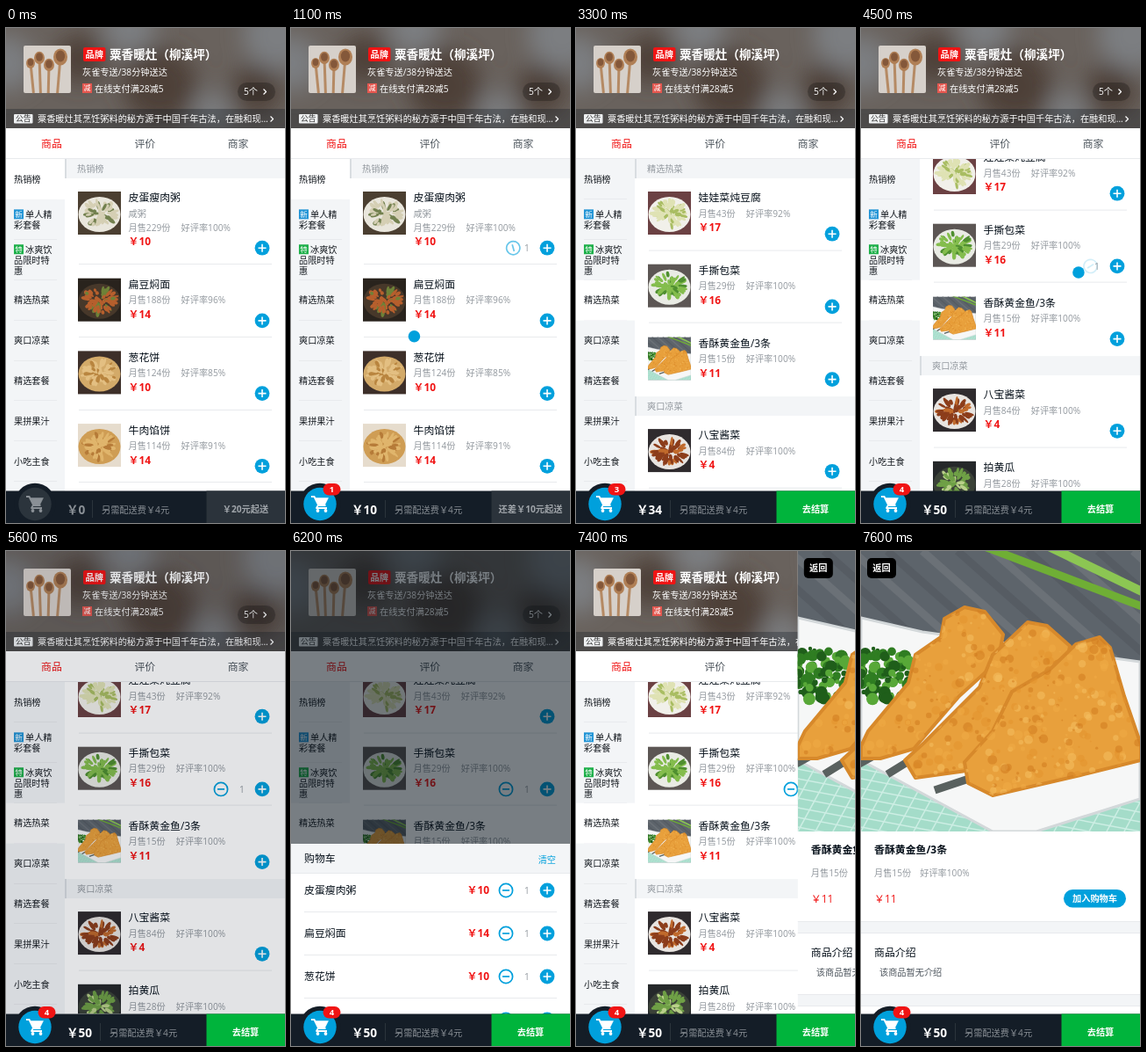
Write an HTML page that moves like this. It is 318 px wide and 563 px high and loops after 8000 ms.

```html
<!DOCTYPE html>
<html lang="zh-CN">
<head>
<meta charset="utf-8">
<style>
html, body { margin: 0; width: 100%; height: 100%; overflow: hidden; background: #fff; }
svg { display: block; font-family: "Open Sans", "Noto Sans CJK SC", "Noto Sans CJK", sans-serif; }
</style>
</head>
<body>
<svg id="stage" width="318" height="563" viewBox="0 0 318 563"></svg>
<script>
const LOOP = 8000, TOP = 149, FOOT = 526.5, ROW = 45.9, ADD_TIME = 240;
const BLUE = '#00a0dc', RED = '#f01414', INK = '#07111b', GREY = '#93999f', PALE = '#f3f5f7', LINE = '#e8eaed';
const SHOP = '粟香暖灶';

// name, sold, rating, price, description, [table, plate, food, garnish]
const sections = [
  ['热销榜', [
    ['皮蛋瘦肉粥', 229, 100, 10, '咸粥', ['#4b3f31', '#e9e6dc', '#d5cfb4', '#72804e']],
    ['扁豆焖面', 188, 96, 14, '', ['#29231d', '#47382a', '#b65f2d', '#6e8238']],
    ['葱花饼', 124, 85, 10, '', ['#3d2f29', '#d3aa69', '#e3bf82', '#b9853f']],
    ['牛肉馅饼', 114, 91, 14, '', ['#e6dccd', '#cf9d54', '#e0b56c', '#b67b38']],
    ['招牌猪肉白菜锅贴/10个', 101, 78, 17, '', ['#5a4b3c', '#eeeae0', '#dfb873', '#b9823c']],
    ['南瓜粥', 91, 100, 9, '甜粥', ['#4d4136', '#f0eee6', '#e8a92f', '#d98e1f']],
    ['红豆薏米美肤粥', 86, 100, 12, '甜粥', ['#66574a', '#eeeae6', '#8d4038', '#c59d86']],
    ['八宝酱菜', 84, 100, 4, '', ['#2f2b2e', '#e8e4e0', '#8c3d1b', '#c06a2c']],
    ['红枣山药糙米粥', 81, 91, 10, '', ['#59483a', '#eee9df', '#d9c6a2', '#9d3b29']],
    ['糊塌子', 80, 93, 10, '', ['#7b6b58', '#eee8dc', '#d9b54f', '#8da04a']]]],
  ['单人精彩套餐', [['红枣山药粥套餐', 17, 100, 29, '', ['#6b5947', '#eee9df', '#d7bd91', '#8c3b2a']]]],
  ['冰爽饮品限时特惠', [['VC无限橙果汁', 15, 100, 8, '', ['#cfd8d2', '#f4e5bd', '#f0a021', '#e87d16']]]],
  ['精选热菜', [
    ['娃娃菜炖豆腐', 43, 92, 17, '', ['#6b4143', '#f1f0ea', '#dfe2b4', '#a9bd62']],
    ['手撕包菜', 29, 100, 16, '', ['#5c5654', '#e9ebe4', '#84bd4d', '#4f8f30']],
    ['香酥黄金鱼/3条', 15, 100, 11, '', null]]],
  ['爽口凉菜', [
    ['八宝酱菜', 84, 100, 4, '', ['#2f2b2e', '#e8e4e0', '#8c3d1b', '#c06a2c']],
    ['拍黄瓜', 28, 100, 2, '', ['#25282a', '#3b4238', '#6fa046', '#b9d08a']]]]
];
const orders = [
  { name: '皮蛋瘦肉粥', price: 10, at: 960, y: 250 },
  { name: '扁豆焖面', price: 14, at: 1260, y: 332 },
  { name: '葱花饼', price: 10, at: 1760, y: 415 },
  { name: '手撕包菜', price: 16, at: 4460, y: 270 }
];

let seed = 7;
const random = () => (seed = seed * 16807 % 2147483647) / 2147483647;
const $ = id => document.getElementById(id);
const clamp = v => Math.max(0, Math.min(1, v));
const span = (t, start, length) => clamp((t - start) / length);
const easeOut = p => 1 - (1 - p) ** 4;

// CSS "ease": cubic-bezier(.25, .1, .25, 1)
function ease(p) {
  const curve = (u, a, b) => 3 * u * (1 - u) ** 2 * a + 3 * u * u * (1 - u) * b + u ** 3;
  let low = 0, high = 1;
  for (let i = 0; i < 20; i++) {
    const mid = (low + high) / 2;
    curve(mid, .25, .25) < p ? low = mid : high = mid;
  }
  return curve(low, .1, 1);
}

const text = (x, y, s, size = 10.2, fill = GREY, more = '') =>
  `<text x="${x}" y="${y + size * .37}" font-size="${size}" fill="${fill}" ${more}>${s}</text>`;
const rect = (x, y, w, h, fill, more = '') =>
  `<rect x="${x}" y="${y}" width="${w}" height="${h}" fill="${fill}" ${more}/>`;
const rule = (x, y, w) => rect(x, Math.round(y), w, 1, LINE);
const circle = (x, y, r, fill, more = '') => `<circle cx="${x}" cy="${y}" r="${r}" fill="${fill}" ${more}/>`;
const ellipse = (x, y, rx, ry, fill, more = '') =>
  `<ellipse cx="${x}" cy="${y}" rx="${rx}" ry="${ry}" fill="${fill}" ${more}/>`;
const path = (d, stroke, width, fill = 'none') =>
  `<path d="${d}" stroke="${stroke}" stroke-width="${width}" fill="${fill}" stroke-linejoin="round"/>`;
const BOLD = 'font-weight="700" ', MEDIUM = 'font-weight="500" ', MID = 'text-anchor="middle" ', END = 'text-anchor="end" ';

const plus = y => circle(292, y, 8.4, BLUE) + path(`M287.5 ${y}h9M292 ${y - 4.5}v9`, '#fff', 1.6);
const minus = y => circle(245, y, 7.6, '#fff', `stroke="${BLUE}" stroke-width="1.7"`) + path(`M241 ${y}h8`, BLUE, 1.7);
const amount = y => text(269, y, 1, 10.2, GREY, MID);

function fishPhoto() {
  const fish = [
    'M0 222L8 205 54 150 62 118 91 98 95 77 118 64 141 69 162 95 156 125 112 165 60 225 22 236 0 236Z',
    'M50 238L72 218 135 155 150 118 172 98 190 81 212 85 238 108 234 130 170 200 120 250 62 258Z',
    'M118 240L150 205 172 160 215 135 245 106 272 98 284 110 300 165 319 220V238L250 255 150 278 122 264Z'];
  let s = rect(0, 0, 318, 319, '#5d646b');
  for (let i = 0; i < 12; i++) s += path(`M${i * 40 - 130} 0l170 150`, i % 2 ? '#6b7177' : '#565c63', 9);
  s += path('M138 -6L320 63', '#6fae35', 9) + path('M212 -6L320 46', '#8cc653', 10);
  s += rect(0, 200, 318, 119, '#a4dcc9');
  for (let i = 0; i < 20; i++) s += path(`M${i * 20 - 60} 319l60 -110M0 ${215 + i * 11}l318 60`, '#cdeee4', 1.5);
  s += path('M0 76L70 92 318 126V282L200 319H150L0 238Z', '#d3d8da', 3, '#f6f7f7');
  for (let i = 0; i < 90; i++) {
    const a = random() * 6.3, r = Math.sqrt(random());
    s += circle(26 + 34 * r * Math.cos(a), 139 + 32 * r * Math.sin(a), 2 + random() * 5, ['#2f7d22', '#58a838', '#1f5e1a'][i % 3]);
  }
  s += path('M-2 242L16 232M30 254L56 238M84 272L132 256', '#59615f', 9);
  fish.forEach((d, i) => {
    s += `<clipPath id="fish${i}"><path d="${d}"/></clipPath>` + path(d, '#d7892b', 4, '#e8a03c') + `<g clip-path="url(#fish${i})">`;
    for (let k = 0; k < 420; k++)
      s += circle(i * 55 + random() * 210, 60 + random() * 220, 1 + random() * 4.5, ['#f6bf62', '#d27d1f', '#f0ab45', '#e4942f'][k % 4], 'opacity=".55"');
    s += '</g>';
  });
  return s;
}

function dishPhoto([table, plate, food, garnish]) {
  let s = rect(0, 0, 49, 49, table) + ellipse(24.5, 26, 24, 20, plate);
  for (let i = 0; i < 70; i++) {
    const a = random() * 6.3, r = Math.sqrt(random());
    const x = 24.5 + 18 * r * Math.cos(a), y = 25 + 14 * r * Math.sin(a);
    s += ellipse(x, y, 2 + random() * 3.5, 1.3 + random(), i % 4 ? food : garnish, `transform="rotate(${a * 57} ${x} ${y})"`);
  }
  return s;
}

const offsets = [];
function foodList() {
  let y = TOP, s = '';
  for (const [title, foods] of sections) {
    offsets.push(y - TOP);
    s += rect(67, y, 251, 22, PALE) + rect(67, y, 2, 22, '#d9dde1') + text(81, y + 11, title);
    y += 22;
    foods.forEach(([name, sold, rate, price, about, look], i) => {
      const extra = about ? 16 : 0, height = 82.2 + extra, control = y + height - 19;
      const photo = look ? dishPhoto(look) : '<use href="#fishPhoto" transform="scale(.154)"/>';
      s += `<g transform="translate(82 ${y + 15})">${photo}</g>`;
      s += text(139.5, y + 22, name, 11.9, INK);
      if (about) s += text(139.5, y + 40, about);
      s += text(139.5, y + 40 + extra, `月售${sold}份<tspan dx="12">好评率${rate}%</tspan>`);
      s += text(139.5, y + 56 + extra, '￥' + price, 11.9, RED, BOLD) + plus(control);
      const order = orders.findIndex(o => o.name === name);
      if (order >= 0)
        s += `<g id="minus${order}" data-y="${control}">${minus(control)}</g><g id="amount${order}">${amount(control)}</g>`;
      if (i < foods.length - 1) s += rule(83, y + height - 1, 220);
      y += height + .5;
    });
  }
  return s;
}

function menu() {
  const labels = [['热销榜'], ['单人精', '彩套餐'], ['冰爽饮', '品限时特', '惠'], ['精选热菜'], ['爽口凉菜'], ['精选套餐'], ['果拼果汁'], ['小吃主食']];
  const badges = { 1: ['新', '#2395d6'], 2: ['特', '#1eb04a'] };
  let s = rect(0, TOP, 67, 414, PALE);
  labels.forEach((_, i) => s += rule(9, TOP + ROW * (i + 1) - 1, 49));
  s += rect(0, TOP, 67, ROW, '#fff', 'id="current"');
  labels.forEach((lines, i) => lines.forEach((line, k) => {
    const y = TOP + ROW * (i + .5) + (k - (lines.length - 1) / 2) * 12, badge = k === 0 && badges[i];
    if (badge) s += rect(9, y - 5.5, 11, 11, badge[1]) + text(14.5, y, badge[0], 8.5, '#fff', MID + MEDIUM);
    s += text(badge ? 22 : 9, y, line, 10.2, '#14191f');
  }));
  return s;
}

function header() {
  let s = `<g clip-path="url(#headClip)">${rect(0, 0, 318, 114, '#69625d')}<g filter="url(#blur)">`;
  for (const [x, y, r] of [[85, 35, 28], [175, 65, 42], [285, 70, 28]]) s += ellipse(x, y, r, r, '#4e4039');
  for (const [x, y, r] of [[0, 40, 32], [140, 0, 30], [310, 8, 40], [235, 95, 22]]) s += ellipse(x, y, r, r, '#7b7e81');
  s += '</g></g>' + rect(0, 92, 318, 22, INK, 'opacity=".28"');
  s += rect(20, 20, 54, 54, '#d6d0ca', 'rx="2"');
  for (const [x, y, r] of [[28, 40, 5], [38, 34, 6], [49, 42, 6], [62, 33, 8]])
    s += path(`M${x} ${y}L${x * .8 + 9} 74`, '#b58a64', 3) + ellipse(x, y, r, r * 1.2, '#b07f55') + ellipse(x, y - 1, r * .65, r * .8, '#84583a');
  s += rect(88, 22, 25.5, 16, RED, 'rx="2"') + text(100.7, 30, '品牌', 10.2, '#fff', MID + BOLD);
  s += text(118, 30, SHOP + '（柳溪坪）', 13.6, '#fff', BOLD) + text(87, 50, '灰雀专送/38分钟送达', 10.2, '#fff', MEDIUM);
  s += rect(87, 63, 11, 11, '#e4574f') + text(92.5, 68.5, '减', 8, '#fff', MID) + text(101, 69, '在线支付满28减5', 10.2, '#fff', MEDIUM);
  s += rect(264, 62, 43, 21, '#000', 'rx="10.5" opacity=".25"') + text(271, 72.5, '5个', 10.2, '#fff', MEDIUM);
  s += path('M293.5 69.5l3 3-3 3M301.5 100.5l3 3-3 3', '#fff', 1.2);
  s += rect(9, 98, 21.5, 10.5, '#eef0f1', 'rx="1"') + text(19.7, 103.2, '公告', 8.8, '#333', MID + MEDIUM);
  s += text(36, 103.2, SHOP + '其烹饪粥料的秘方源于中国千年古法，在融和现...', 10.2, '#fff', MEDIUM);
  s += rect(0, 114, 318, 35, '#fff') + rule(0, 148, 318);
  ['商品', '评价', '商家'].forEach((tab, i) => s += text(52 + i * 106.3, 131.5, tab, 11.9, i ? '#4d555d' : RED, MID));
  return s;
}

function cartList() {
  let s = rect(0, 309, 318, 218, '#fff') + rect(0, 309, 318, 34, PALE) + rule(0, 342, 318);
  s += text(15, 326, '购物车', 11.9, INK) + text(302, 327, '清空', 10.2, BLUE, END);
  orders.forEach(({ name, price }, i) => {
    const y = 362 + i * 49;
    s += text(15, y, name, 11.9, INK) + text(226, y, '￥' + price, 11.9, RED, END + BOLD);
    s += minus(y) + amount(y) + plus(y) + rule(15, y + 24, 288);
  });
  return s;
}

function detail() {
  const band = (y, h) => rect(0, y, 318, h, PALE) + rule(0, y, 318) + rule(0, y + h - 1, 318);
  return rect(0, 0, 318, 563, '#fff') + '<use href="#fishPhoto"/>' +
    rect(7, 8, 33, 23, '#000', 'rx="5"') + text(23.5, 19.5, '返回', 10.2, '#fff', MID + BOLD) +
    text(15, 340, '香酥黄金鱼/3条', 11.9, INK, BOLD) + text(15, 366, '月售15份<tspan dx="10">好评率100%</tspan>') +
    text(15, 396, '￥11', 11.9, RED) +
    rect(231, 385, 71, 20.5, BLUE, 'rx="10.2"') + text(266.5, 395.5, '加入购物车', 10.2, '#fff', MID + BOLD) +
    band(421, 14) + text(15, 457, '商品介绍', 11.9, INK) + text(21, 479, '该商品暂无介绍', 10.2, '#4d555d') + band(504, 14);
}

function footer(count, total) {
  const ready = total >= 20, x = total < 10 ? 98 : 107, dim = '#8a9096', icon = count ? '#fff' : dim;
  const label = ready ? '去结算' : total ? `还差￥${20 - total}元起送` : '￥20元起送';
  let s = rect(0, FOOT, 318, 37, '#141d27') + rect(228.5, FOOT, 90, 37, ready ? '#00b43c' : '#2b333b');
  s += circle(33, 541.5, 23.7, '#141d27') + circle(33, 541.5, 18.7, count ? BLUE : '#2b343c');
  s += path('M23 533h3.5l5 10h8', icon, 2) + path('M27.5 534.5h15l-4 8H31z', icon, .5, icon) + path('M31 542.5l-2 3.5h12', icon, 1.8);
  s += circle(30.5, 549, 1.9, icon) + circle(39.5, 549, 1.9, icon);
  if (count) s += rect(36.5, 518, 20, 13.5, RED, 'rx="6.7"') + text(46.5, 524.8, count, 9.5, '#fff', MID + BOLD);
  s += text(69, 547.5, '￥' + total, 13.6, icon, BOLD) + rect(x, 537, 1, 20, '#2b343c');
  return s + text(x + 11, 548, '另需配送费￥4元', 10.2, dim) + text(273, 547.5, label, 10.2, ready ? '#fff' : '#a0a5aa', MID + BOLD);
}

$('stage').innerHTML = `
  <defs>
    <clipPath id="listClip">${rect(67, TOP, 251, 414)}</clipPath>
    <clipPath id="headClip">${rect(0, 0, 318, 114)}</clipPath>
    <clipPath id="photoClip">${rect(0, 0, 318, 319)}</clipPath>
    <filter id="blur" x="-50%" y="-50%" width="200%" height="200%"><feGaussianBlur stdDeviation="13"/></filter>
    <g id="fishPhoto" clip-path="url(#photoClip)">${fishPhoto()}</g>
  </defs>
  ${menu()}
  <g clip-path="url(#listClip)"><g id="foods">${foodList()}</g></g>
  ${header()}
  ${rect(0, 0, 318, 563, INK, 'id="mask"')}
  <g id="cart">${cartList()}</g>
  <g id="detail">${detail()}</g>
  <g id="footer"></g>
  <g id="balls">${orders.map(() => circle(0, 0, 6.8, BLUE)).join('')}</g>`;

let shownCount = -1;
const move = (id, x, y) => $(id).setAttribute('transform', `translate(${x} ${y})`);

function render(t) {
  const scroll = offsets[3] * easeOut(span(t, 2960, 320)) + 46 * easeOut(span(t, 3760, 230));
  move('foods', 0, -scroll);
  const current = offsets.findLastIndex(y => scroll >= y - .5);
  $('current').setAttribute('y', TOP + ROW * current);

  orders.forEach(({ at, y }, i) => {
    const p = span(t, at, ADD_TIME), button = $('minus' + i);
    button.setAttribute('transform', `translate(${20 * (1 - p)} 0) rotate(${180 * (1 - p)} 245 ${button.dataset.y})`);
    button.setAttribute('opacity', p);
    $('amount' + i).setAttribute('opacity', p > 0 ? 1 : 0);
    const ball = $('balls').children[i];
    ball.setAttribute('cx', 292 - 258 * p);
    ball.setAttribute('cy', y + (542 - y) * p * p);
    ball.setAttribute('opacity', p > 0 && p < 1 ? 1 : 0);
  });

  const placed = orders.filter(o => t >= o.at);
  if (placed.length !== shownCount) {
    shownCount = placed.length;
    $('footer').innerHTML = footer(shownCount, placed.reduce((sum, o) => sum + o.price, 0));
  }

  $('mask').setAttribute('opacity', .6 * (ease(span(t, 5525, 500)) - ease(span(t, 6150, 500))));
  move('cart', 0, 218 * (1 - ease(span(t, 5600, 260)) + ease(span(t, 6178, 210))));
  move('detail', 318 * (1 - span(t, 7360, 200)), 0);
}

const start = performance.now();
function tick() {
  render((performance.now() - start) % LOOP);
  requestAnimationFrame(tick);
}
tick();
</script>
</body>
</html>
```
